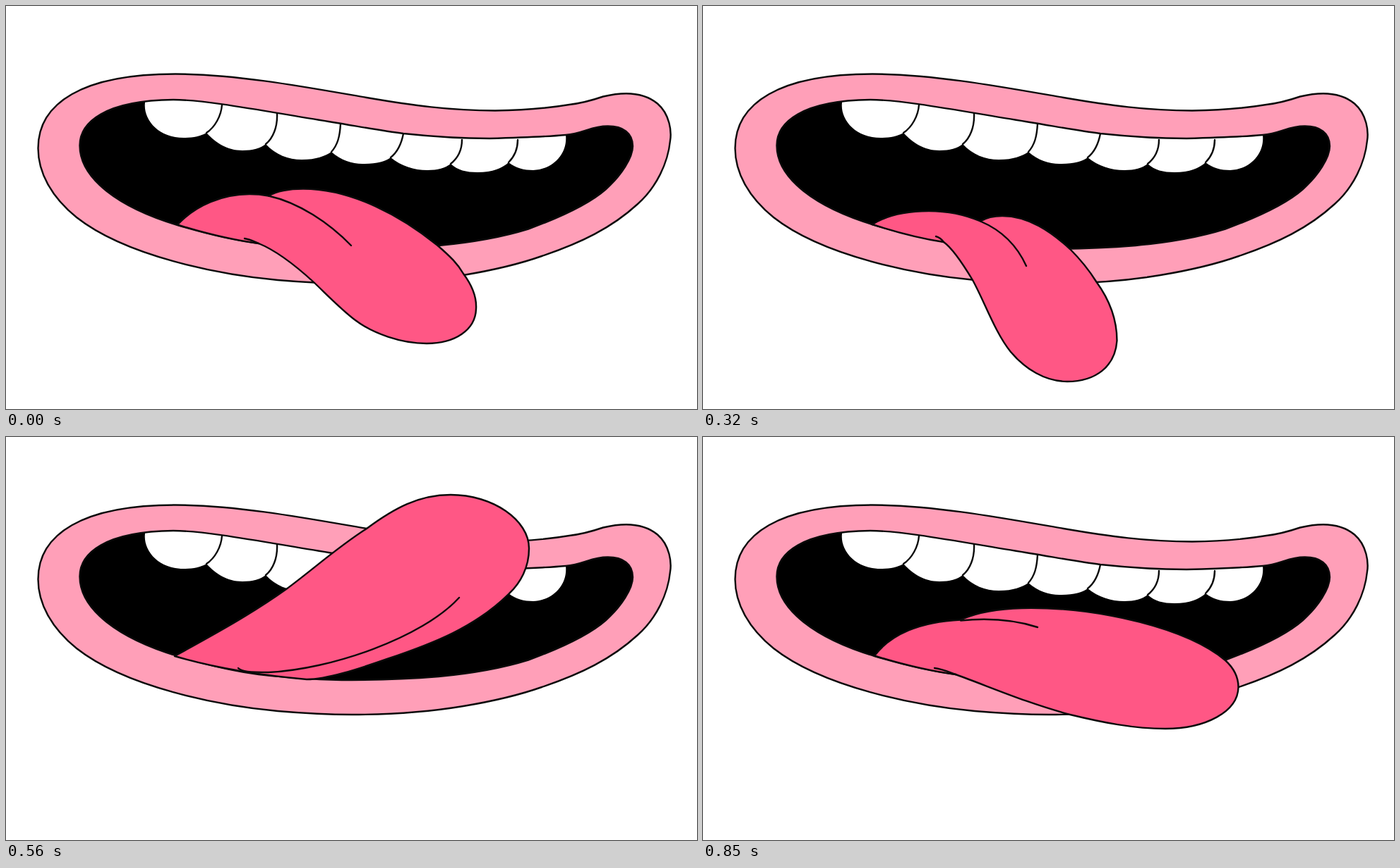
An HTML page that plays this animation: 979 px wide and 572 px high, repeating every 930 ms.

```html
<!DOCTYPE html>
<html lang="en">
<head>
<meta charset="utf-8">
<title>Wagging tongue</title>
<style>
  html, body { margin: 0; width: 100%; height: 100%; overflow: hidden; background: #fff; }
  svg { display: block; width: 100vw; height: 100vh; }
  .ink { stroke: #0a0a0a; stroke-width: 2.4; stroke-linecap: round; stroke-linejoin: round; fill: none; }
</style>
</head>
<body>
<svg viewBox="0 0 979 572">
  <defs>
    <path id="mouth" d="M104.5 198C104.5 165 140 134 237 133C285 133 370 150 463 165C500 171 532 177 563 181
      C610 186 640 188 685 188C725 187 760 186 793 183C818 181 830 170 853 170.5C874 170.5 888 180 888 199
      C888 215 872 240 850 260C825 282 785 300 740 316.5C700 329 655 336 613 340C575 343 530 345 490 345
      C450 345 400 341.5 358 337C320 332 280 322 243 311C160 286 104.5 245 104.5 198Z"/>
    <clipPath id="inside"><use href="#mouth"/></clipPath>
  </defs>

  <path class="ink" style="fill:#ff9fb8" d="M45.5 202C45.5 138 108 96.5 240 96.5C330 97 425 115 511 130
    C575 141 630 148.5 693 148.5C735 148 768 145 798 140C815 138 830 134 846 128.5C873 122 902 121 923 138.5
    C941 154 943 179 941 191C938 222 922 257 895 281C858 315 815 336 759 355C725 367 690 375 648 382
    C600 390 545 394 490 394C455 394 420 392 385 389C300 381 170 355 100 300C64 271 45.5 236 45.5 202Z"/>
  <use href="#mouth"/>

  <g clip-path="url(#inside)">
    <path fill="#fff" d="M197 137C194 160 215 187 252 187C265 187 275 185 284 180
      C297 194 313 205 335 205C350 205 360 202 368 196C382 211 400 218 419 218C440 218 452 213 461 207
      C475 219 490 224 505 224C525 224 537 221 545 215C560 227 578 233 597 233C612 233 622 230 630 224
      C640 233 652 236 668 236C690 236 703 230 712 222C722 230 734 233 747 233C775 232 796 210 793 183
      L793 160L197 120Z"/>
    <path class="ink" d="M306 140C305 156 296 172 284 180M384 152C385 172 378 188 368 196
      M474 167C473 185 470 197 461 207M563 181C560 197 555 207 545 215
      M646 190C646 205 640 216 630 224M725 190C725 202 720 214 712 222"/>
  </g>
  <use href="#mouth" class="ink"/>

  <path id="tongue" class="ink" style="fill:#ff5785"/>
  <path id="crease" class="ink"/>
</svg>

<script>
  // Each pose is [body, creases].
  const right = [
    "M243 310.5C269 282 308 267 345 267C355 267 364 268 372 269.5C385 262 403 259.5 421 259.5" +
    "C491 259.5 561 299 611 339.5C630 356 640 366 648 380C660 396 667 414 666 430" +
    "C665 460 636 479 596 479C560 479 520 465 495 446C475 431 455 410 436 392" +
    "C412 370 385 348 358 337C320 332 280 322 243 310.5Z",
    "M372 269.5C415 279 458 308 489 340M338 330C345 331 351 334 358 337"
  ];
  const low = [
    "M240 310C261 296.5 290 291 320 291C347 291 371 296 393 305.5C402 300 412 298 424 298" +
    "C461 298 493 320 520 345C536 361 547 375 557 391C576 417 586.5 446 586.5 475" +
    "C584 512 556 533 516 533C485 533 456 515 436 491C414 464 399 420 382 389" +
    "C370 369 355 345 341 335C308 330 274 321 240 310Z",
    "M393 305.5C420 317 444 338 458 369M330 327C334 328 338 331 341 335"
  ];
  const side = [
    "M243 310.5C266 280 308 262 365 259.5C390 248 422 242.8 465 242.8C563 242.8 685 271 740 317" +
    "C752 328 758.5 342 758.5 355C758 390 712 414 655 414C610 414 565 405 520 394" +
    "C460 378 410 356 358 337C320 332 280 322 243 310.5Z",
    "M365 260.5C400 257 440 259 474 270M328 328C338 329 347 333 358 337"
  ];
  const up = [
    "M239 311C295 280 345 253 397 216C435 188 470 156 511 130C550 101 585 82 630 82" +
    "C690 82 741 118 741 158C741 185 729 207 713 222C665 270 605 293 540 315" +
    "C500 329 455 344 426 344C360 338 300 329 239 311Z",
    "M329 328C334 333 345 334 372 334C460 330 590 285 642 228"
  ];
  const peak = [
    "M239 311C287 277 335 243 381 203C414 172 444 136 478 107C512 74 543 50 588 43" +
    "C647 34 703 62 709 101C713 128 705 151 691 168C652 222 596 256 535 286" +
    "C498 306 455 338 426 344C360 338 300 329 239 311Z",
    "M329 328C334 333 345 334 372 332C460 322 569 262 612 191"
  ];

  const NUM = /[\d.]+/g;
  // Blend two poses with the same structure; k above 1 overshoots.
  const blend = (a, b, k) => a.map((path, i) => {
    const goal = b[i].match(NUM);
    let n = 0;
    return path.replace(NUM, v => (+v + (goal[n++] - v) * k).toFixed(1));
  });

  const swing = [
    [0, right], [80, blend(right, low, 0.5)], [160, low], [240, blend(right, low, 1.33)],
    [320, low], [400, right], [480, side], [560, up], [640, peak], [770, up], [850, side]
  ];
  const LOOP = 930;
  const tongue = document.getElementById("tongue");
  const crease = document.getElementById("crease");

  function draw(ms) {
    const t = ms % LOOP;
    const [, pose] = swing.filter(([start]) => start <= t).pop();
    tongue.setAttribute("d", pose[0]);
    crease.setAttribute("d", pose[1]);
  }

  const begin = performance.now();
  function tick() {
    draw(Math.max(0, performance.now() - begin));
    requestAnimationFrame(tick);
  }
  tick();
</script>
</body>
</html>
```
